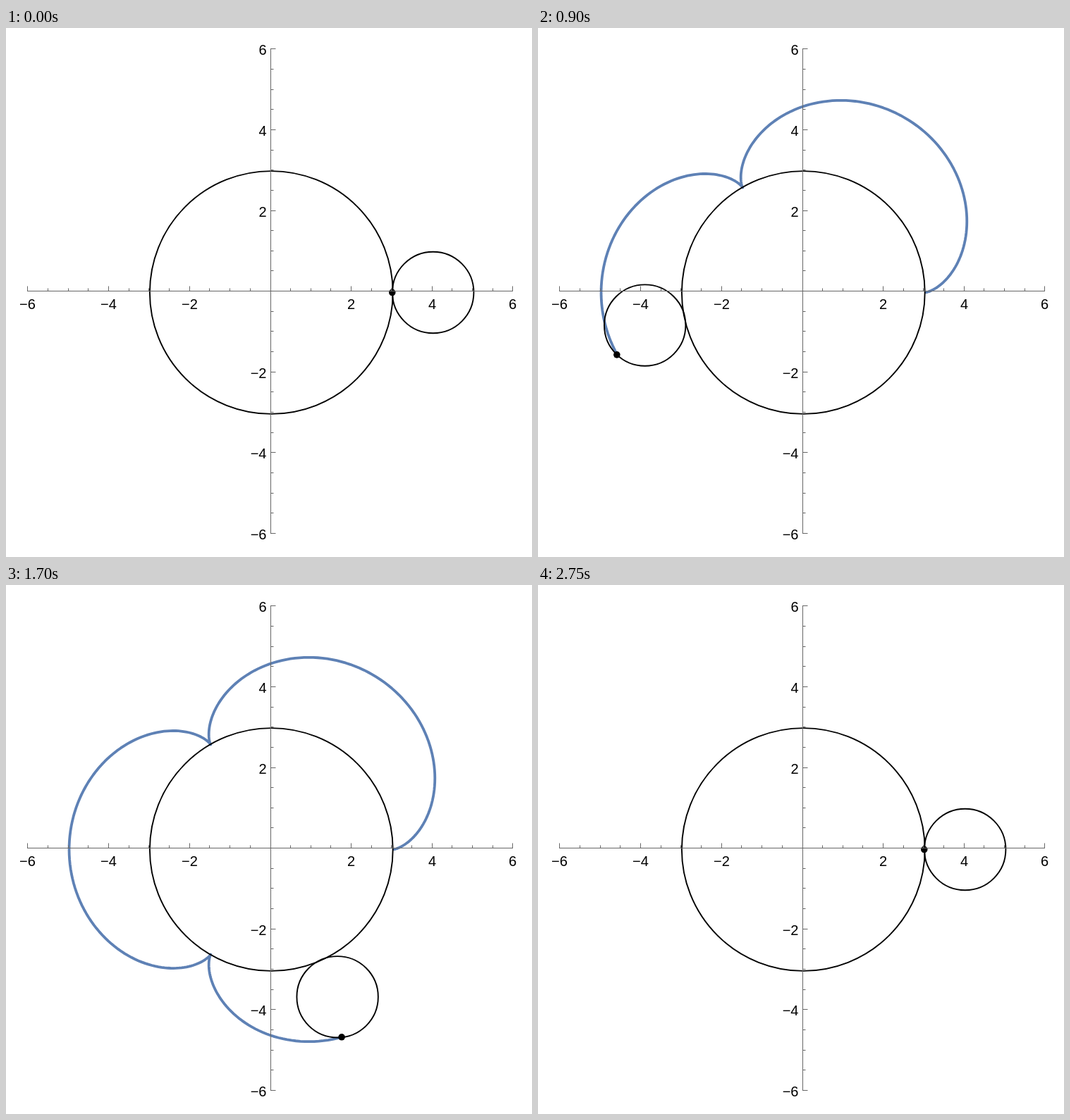
Write an HTML page that moves like this. It is 746 px wide and 751 px high and loops after 3 s.

```html
<!DOCTYPE html>
<html lang="en">
<head>
<meta charset="utf-8">
<title>Epicycloid</title>
<style>
  html, body { margin: 0; width: 100%; height: 100%; overflow: hidden; background: #fff; }
  svg { display: block; }
  text { font: 20px "Liberation Sans", Arial, sans-serif; fill: #000; }
  .ring { fill: none; stroke: #000; stroke-width: 1.9; }
  #trail { fill: none; stroke: #5e81b5; stroke-width: 3.8; stroke-linejoin: round; }
  #axes { fill: none; stroke: #666; stroke-width: 1; }
</style>
</head>
<body>
<svg width="746" height="751" viewBox="0 0 746 751">
  <path id="trail"/>
  <circle class="ring" cx="376.3" cy="375.5" r="172.4"/>
  <circle class="ring" id="wheel" r="57.7"/>
  <circle id="pen" r="4.8"/>
  <path id="axes"/>
  <g id="labels"></g>
</svg>
<script>
const $ = id => document.getElementById(id);
const UNIT = 57.35, CX = 376.3, CY = 375.5;
const LOOP = 3000, TICK = 50, FRAMES = LOOP / TICK, HOLD = 4;
const STEP = 14.634 * Math.PI / 180, LAG = 0.9;

function label(x, y, v, anchor) {
  const t = document.createElementNS("http://www.w3.org/2000/svg", "text");
  t.setAttribute("x", x);
  t.setAttribute("y", y);
  t.setAttribute("text-anchor", anchor);
  t.textContent = String(v).replace("-", "\u2212");
  $("labels").append(t);
}

function drawAxes() {
  const snap = p => Math.floor(p) + 0.5;
  let d = "M30 373.5H719M375.5 29V718";
  for (let v = -6; v <= 6; v += 0.5) {
    if (v === 0) continue;
    const major = v % 2 === 0, len = major ? 7 : 4;
    const x = snap(374.8 + UNIT * v), y = snap(373.6 - 57.3 * v);
    d += `M${x} 373.5v${-len}M375.5 ${y}h${len}`;
    if (major) {
      label(x, 399, v, "middle");
      label(369.5, y + 8.5, v, "end");
    }
  }
  $("axes").setAttribute("d", d);
}

// Pen position on a unit wheel rolling around a circle of radius 3
const penAt = a => [
  CX + UNIT * (4 * Math.cos(a) - Math.cos(4 * a)),
  CY - UNIT * (4 * Math.sin(a) - Math.sin(4 * a))
];

function place(id, x, y) {
  $(id).setAttribute("cx", x);
  $(id).setAttribute("cy", y);
}

function angleAt(ms) {
  const i = Math.floor((ms % LOOP) / TICK);
  const n = Math.min(i, FRAMES - 1 - i) - HOLD;
  return Math.max(0, n - LAG) * STEP;
}

function draw(a) {
  place("wheel", CX + 4 * UNIT * Math.cos(a), CY - 4 * UNIT * Math.sin(a));
  const [px, py] = penAt(a);
  place("pen", px - 0.6, py);

  const points = [];
  const count = Math.ceil(a / 0.015);
  for (let k = 0; k <= count && count; k++) {
    points.push(penAt(a * k / count).map(c => c.toFixed(2)).join(" "));
  }
  $("trail").setAttribute("d", points.length ? "M" + points.join("L") : "");
}

let last = -1;
const start = performance.now();
function frame() {
  const a = angleAt(performance.now() - start);
  if (a !== last) draw(last = a);
  requestAnimationFrame(frame);
}

drawAxes();
frame();
</script>
</body>
</html>
```
